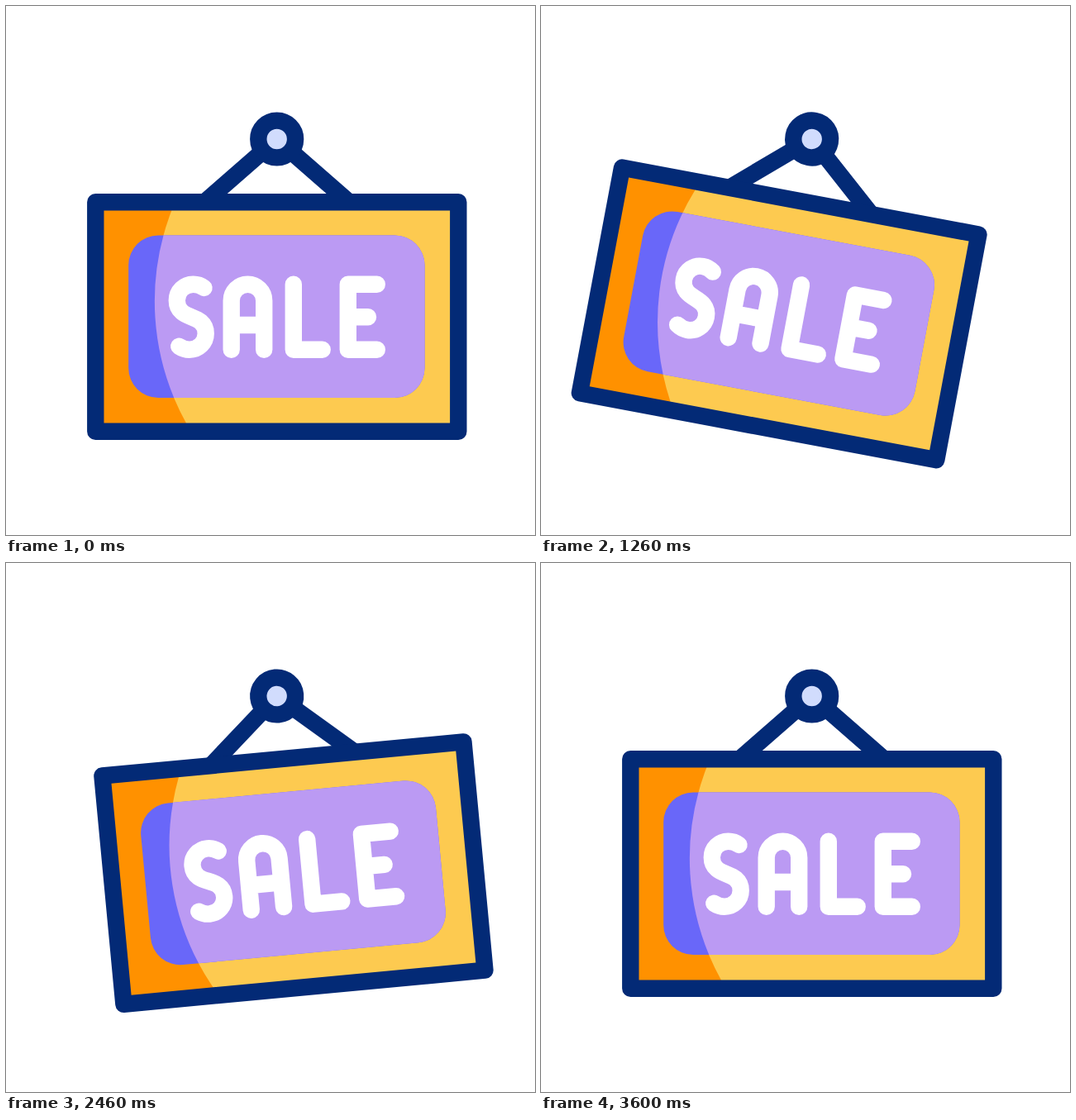
These frames come from a looping animation (640x640 px, 3.62 s). An HTML page:

```html
<!DOCTYPE html>
<html lang="en">
<head>
<meta charset="utf-8">
<title>Swinging sale sign</title>
<style>
  html, body { margin: 0; width: 100%; height: 100%; overflow: hidden; background: #fff; }
  svg { display: block; width: 100%; height: 100%; }
  .line { fill: none; stroke: #032a76; }
  .letters { fill: none; stroke: #fff; }
  g { stroke-width: 20.4; stroke-linecap: round; stroke-linejoin: round; }
</style>
</head>
<body>
<svg viewBox="0 0 640 640" role="img" aria-label="SALE">
  <g id="sign">
    <path class="line" d="M241 236.7 327.7 161 414.4 236.7"/>
    <rect x="108.3" y="237.3" width="439" height="277.5" fill="#ff9100"/>
    <path fill="#fdca50" d="M200.3 247.5A304 304 0 0 0 217.9 504.5V506H540V240H203Z"/>
    <rect x="148.2" y="277.5" width="358.3" height="196.5" rx="36" fill="#6967f9"/>
    <path fill="#bb9af3" d="M190.5 277.5A304 304 0 0 0 203.2 474H470.5a36 36 0 0 0 36-36V313.5a36 36 0 0 0-36-36Z"/>
    <rect class="line" x="108.3" y="237.3" width="439" height="277.5"/>
    <circle class="line" cx="327.7" cy="161" r="22.4" style="fill:#d1dcfd"/>
    <g class="letters">
      <path d="M239.5 341C236 338.3 231.5 336.7 226.5 336.7C215.5 336.7 206.8 345.3 206.8 356.2C206.8 369.5 217 373.5 224.2 376.2C231.5 379 241.7 383 241.7 396.2C241.7 407 233 415.7 222 415.7C217 415.7 213 414.2 209.3 411.7"/>
      <path d="M272.7 415.7V356.5a19.75 19.75 0 0 1 39.5 0V415.7M272.7 386H312.2"/>
      <path d="M347.8 336.7V415.7H382.7"/>
      <path d="M448.8 336.7H413.8V415.7H448.8M413.8 376.2H438"/>
    </g>
  </g>
</svg>
<script>
  const LOOP = 3620, SWING = 400;
  const angles = [0, 16, -14, 12, -10, 8, -6, 4, -2, 0];
  const sign = document.getElementById('sign');

  function angleAt(time) {
    const pos = Math.min(time / SWING, angles.length - 1);
    const i = Math.min(Math.floor(pos), angles.length - 2);
    const t = pos - i;
    return angles[i] + (angles[i + 1] - angles[i]) * t * t * (3 - 2 * t);
  }

  function draw() {
    sign.setAttribute('transform', `rotate(${angleAt(performance.now() % LOOP)} 327.7 161)`);
    requestAnimationFrame(draw);
  }
  draw();
</script>
</body>
</html>
```
